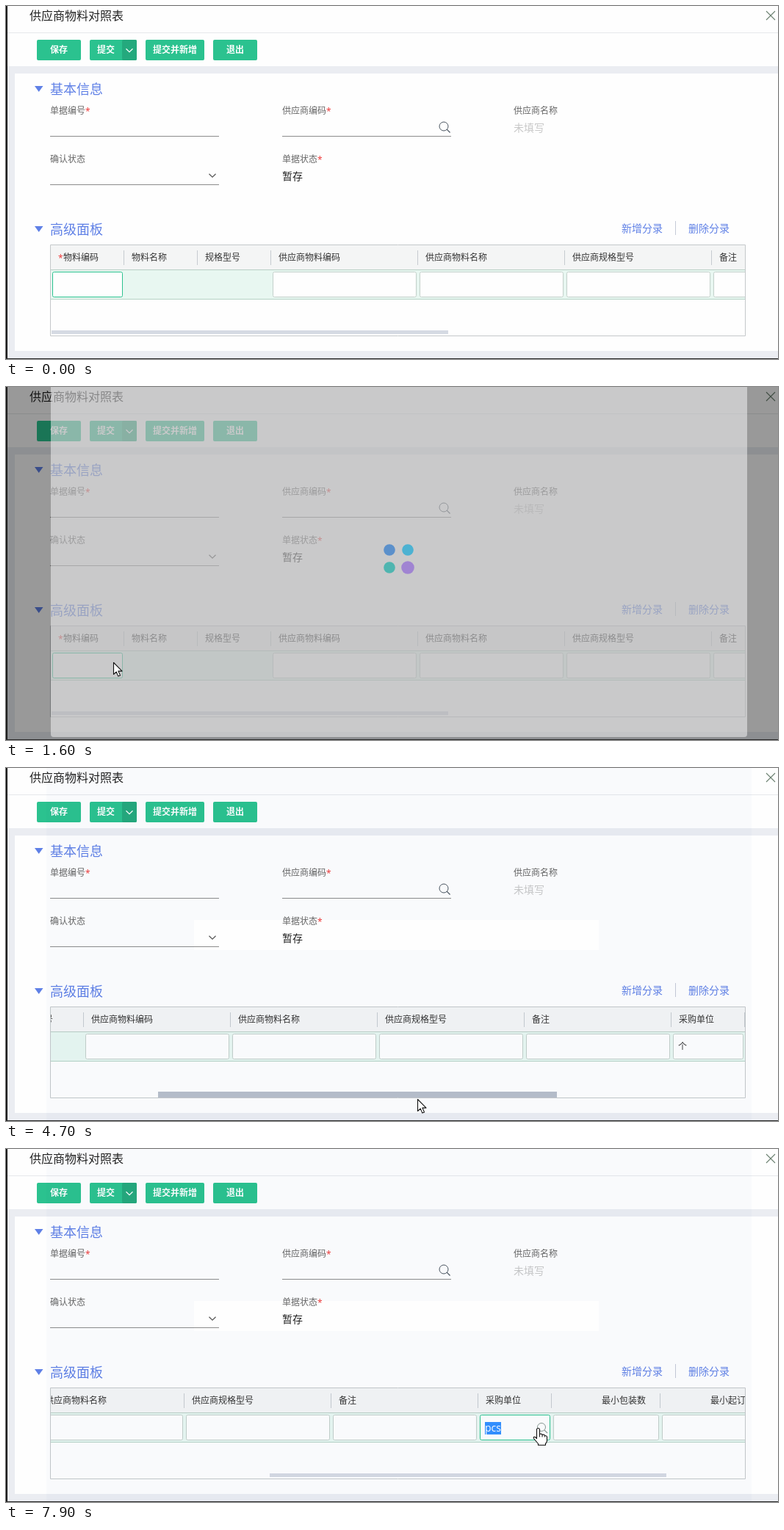
An HTML page with a canvas for the animation above (8000 ms loop, 1051 px wide and 481 px high).

```html
<!DOCTYPE html>
<html lang="zh-CN">
<head>
<meta charset="utf-8">
<style>
html, body { margin: 0; width: 1051px; height: 481px; overflow: hidden; }
canvas { display: block; }
</style>
</head>
<body>
<canvas id="stage" width="1051" height="481"></canvas>
<script>
const c = document.getElementById('stage').getContext('2d');
const LOOP = 8000, GREEN = '#2bc28f', BLUE = '#5f80e6', INK = '#333', GREY = '#666';

// ---------- drawing helpers ----------
function rect(x, y, w, h, fill) {
  c.fillStyle = fill;
  c.fillRect(x, y, w, h);
}

function box(x, y, w, h, fill, stroke, r = 2) {
  c.beginPath();
  const d = stroke ? 0.5 : 0;
  c.roundRect(x + d, y + d, w - 2 * d, h - 2 * d, r);
  if (fill) { c.fillStyle = fill; c.fill(); }
  if (stroke) { c.strokeStyle = stroke; c.lineWidth = 1; c.stroke(); }
}

// y is the vertical middle of the glyphs
function text(s, x, y, size = 12, color = INK, align = 'left', weight = 400) {
  c.font = `${weight} ${size}px "Open Sans", "Noto Sans CJK SC", "Noto Sans CJK", sans-serif`;
  c.textAlign = align;
  c.fillStyle = color;
  c.fillText(s, x, y + size * 0.37);
  return c.measureText(s).width;
}

function line(color, width, ...p) {
  c.beginPath();
  for (let i = 0; i < p.length; i += 2) c.lineTo(p[i], p[i + 1]);
  c.strokeStyle = color;
  c.lineWidth = width;
  c.stroke();
}

function poly(fill, ...p) {
  c.beginPath();
  for (let i = 0; i < p.length; i += 2) c.lineTo(p[i], p[i + 1]);
  c.closePath();
  c.fillStyle = fill;
  c.fill();
}

function circle(x, y, r, fill, stroke) {
  c.beginPath();
  c.arc(x, y, r, 0, 7);
  if (fill) { c.fillStyle = fill; c.fill(); }
  if (stroke) { c.strokeStyle = stroke; c.lineWidth = 1; c.stroke(); }
}

const chevron = (x, y, color = '#555', s = 4.5) =>
  line(color, 1.2, x - s, y - s / 2, x, y + s / 2, x + s, y - s / 2);

function cross(x, y, s, color) {
  line(color, 1.1, x - s, y - s, x + s, y + s);
  line(color, 1.1, x - s, y + s, x + s, y - s);
}

function magnifier(x, y, color, r = 6) {
  circle(x - 1, y - 1, r, null, color);
  line(color, 1.2, x - 1 + r * 0.7, y - 1 + r * 0.7, x + r + 1.5, y + r + 1.5);
}

// linear interpolation through [time, ...values] keys
function track(keys, t) {
  let i = keys.findIndex(k => k[0] > t);
  if (i < 0) return keys[keys.length - 1].slice(1);
  if (i === 0) return keys[0].slice(1);
  const a = keys[i - 1], b = keys[i], p = (t - a[0]) / (b[0] - a[0]);
  return a.slice(1).map((v, n) => v + (b[n + 1] - v) * p);
}

// ---------- form page ----------
function button(label, x, w) {
  box(x, 46, w, 28, GREEN);
  return text(label, x + w / 2, 60, 12, '#fff', 'center', 600);
}

function heading(label, y) {
  poly(BLUE, 39, y - 4, 50.5, y - 4, 44.7, y + 4);
  text(label, 60, y, 18, BLUE);
}

function label(s, x, y, required) {
  const w = text(s, x, y, 12, GREY);
  if (required) text('*', x + w, y + 1, 12, '#e33');
}

function page(t) {
  rect(0, 0, 1051, 481, '#ebedf2');
  rect(0, 0, 1051, 82, '#fefefe');
  rect(0, 36, 1051, 1, '#e6e8eb');
  rect(12, 92, 1039, 378, '#fefefe');
  text('供应商物料对照表', 32, 13, 16, '#222');
  cross(1041, 13, 6, '#6b8070');

  button('保存', 42, 60);
  box(114, 46, 64, 28, GREEN);
  text('提交', 136, 60, 12, '#fff', 'center', 600);
  box(158, 46, 20, 28, '#24a97d');
  chevron(168, 60.5, '#fff');
  button('提交并新增', 190, 80);
  button('退出', 282, 60);

  heading('基本信息', 113);
  label('单据编号', 60, 143, true);
  label('供应商编码', 376, 143, true);
  label('供应商名称', 691, 143);
  text('未填写', 691, 166, 14, '#c8c8c8');
  label('确认状态', 60, 209);
  label('单据状态', 376, 209, true);
  text('暂存', 376, 232, 14, '#222');
  for (const [x, y] of [[60, 177], [376, 177], [60, 243]]) rect(x, y, 230, 1, '#8c8c8c');
  magnifier(597, 165, '#4a5560');
  chevron(281, 231);

  heading('高级面板', 304);
  text('新增分录', 838, 303, 14, BLUE);
  text('删除分录', 929, 303, 14, BLUE);
  rect(911, 293, 1, 19, '#c5cad6');
  grid(t);
}

const COLS = [
  ['物料编码', 100, true, 'G21048111'], ['物料名称', 100, false, 'SRM TEST 1'],
  ['规格型号', 100, false, 'TEST 2'], ['供应商物料编码', 200, true],
  ['供应商物料名称', 200, true], ['供应商规格型号', 200, true],
  ['备注', 200, true], ['采购单位', 100, true, '个'],
  ['最小包装数', 148, true], ['最小起订量', 148, true]
];
const THUMB = [[4400, 0], [4700, 146], [5100, 297]];

function grid(t) {
  const [thumb] = track(THUMB, t);
  const filled = t >= 4000, focus = t < 7300 ? 0 : 7, drag = t >= 4400 && t < 5400;
  rect(60, 325, 947, 125, '#fefefe');
  rect(60, 326, 947, 33, '#f4f5f5');
  rect(60, 360, 947, 39, '#e8f7f1');
  rect(60, 359, 947, 1, '#b9cfc5');
  rect(60, 399, 947, 1, '#b4d3c5');

  c.save();
  c.beginPath();
  c.rect(61, 326, 945, 123);
  c.clip();
  let x = 60 - Math.round(thumb * 1.744);
  COLS.forEach(([name, w, input, value], i) => {
    if (i > 7) text(name, x + w - 19, 343, 12, INK, 'right');
    else text(name, x + (i ? 11 : 18), 343);
    if (!i) text('*', x + 11, 344, 12, '#e33');
    rect(x + w, 333, 1, 20, '#c6cbd0');
    if (input) box(x + 3, 362, w - 4, 35, '#fefefe', i === focus ? GREEN : '#c3d0ca');
    if (i === 7 && focus === 7) magnifier(x + 88, 380, '#8a9a94', 5.5);
    if (i === 7 && t >= 7600) {
      rect(x + 10, 372, 22, 17, '#3390ff');
      text('pcs', x + 10, 380, 14, '#fff');
    } else if (filled && value) text(value, x + 10, 380);
    x += w;
  });
  if (drag) rect(61 + thumb, 441, 543, 8, '#b8bfcb');
  else rect(62 + thumb, 442, 540, 5, '#d5dae3');
  c.restore();
  box(60, 325, 947, 125, null, '#c4c8ca', 0);
}

// ---------- material picker ----------
const ITEMS = [
  ['002', '电脑', 'DIAN02'], ['G21048104', 'SRM TEST 1', 'TEST 2'],
  ['G21048111', 'SRM TEST 1', 'TEST 2'], ['G21048112', 'SRM TEST 1', 'TEST 2'],
  ['Item-00000001', '软件', 'AAA'], ['Item-00000002', '测试辅助', 'BBB'],
  ['Item-00000011', '测试02', '02'], ['', '', '']
];
const RULE = '#c3c7cb', PAPER = '#f9fafc';

function tree() {
  text('物料基本分类标准', 63, 75);
  chevron(235, 75);
  rect(62, 91, 182, 1, '#8c9096');
  rect(55, 113, 199, 28, '#69d5b1');
  poly('#fff', 55, 124, 65, 124, 60, 131);
  text('全部', 71, 127, 14, '#fff', 'left', 600);
  poly('#a5b2d6', 77, 150.5, 77, 159.5, 83.5, 155);
  text('待分类', 91, 155);
  for (let y = 183; y < 360; y += 28) text('name001', 91, y);
  text('包含下级', 111, 414, 12, GREY);
  box(167, 404, 36, 21, '#29b574', null, 10.5);
  circle(192.5, 414.5, 9, '#fff');
}

function pager() {
  text('共 1 页', 458, 73, 12, GREY);
  text('第', 506, 73, 12, GREY);
  box(523, 62, 30, 23, '#fff', '#bbb');
  text('1', 538, 73, 12.4, INK, 'center');
  text('页', 556, 73, 12, GREY);
  [579, 613, 647, 681].forEach((x, i) => {
    const m = x + 12, s = i < 2 ? -1 : 1;
    box(x, 62, 24, 23, null, '#dfe1e4');
    line('#c4c6ca', 1.1, m - 3 * s, 68, m + 2 * s, 73.5, m - 3 * s, 79);
    if (i % 3 === 0) line('#c4c6ca', 1.1, m + 5 * s, 68, m + 5 * s, 79);
  });
  box(705, 62, 100, 23, '#fff', '#c8cbd0');
  text('20条 / 页', 720, 73, 12.2, GREY);
  chevron(793, 73);
}

function items(picked, loaded) {
  rect(256, 94, 559, 33, '#f4f5f7');
  rect(256, 127, 551, 1, RULE);
  circle(273.5, 112, 6.5, '#fff', '#c4c6ca');
  text('编码', 346, 112);
  text('名称', 496, 112);
  text('规格型号', 696, 112);
  rect(485, 101, 1, 21, RULE);
  rect(685, 101, 1, 21, RULE);
  rect(785, 94, 1, 33, '#d8dbdf');
  circle(800, 110, 2.5, null, '#6b8ac4');
  circle(800, 110, 5.5, null, '#6b8ac4');
  for (let a = 0; a < 6.2; a += Math.PI / 4)
    line('#6b8ac4', 1.6, 800 + 5.5 * Math.cos(a), 110 + 5.5 * Math.sin(a), 800 + 7.2 * Math.cos(a), 110 + 7.2 * Math.sin(a));
  if (!loaded) return;

  c.save();
  c.beginPath();
  c.rect(256, 128, 559, 303);
  c.clip();
  ITEMS.forEach(([code, name, model], i) => {
    const y = 148 + 40 * i, on = picked && i === 2;
    rect(256, y - 20, 551, 39, on ? '#e9f7f0' : i % 2 ? '#f7f8f9' : PAPER);
    rect(256, y + 19, 551, 1, RULE);
    circle(273.5, y, on ? 7 : 6.5, on ? GREEN : '#fff', on ? GREEN : '#cfd1d5');
    if (on) line('#fff', 1.6, 270, y, 272.8, y + 2.8, 277.3, y - 2.3);
    text(i + 1, 313, y, 12.4, INK, 'center');
    const w = text(code, 346.5, y, 12.4, '#2a86e8');
    rect(346.5, y + 6, w, 1, '#2a86e8');
    text(name, 496.5, y, 12.4);
    text(model, 696.5, y, 12.4);
  });
  c.restore();
  rect(337, 424, 206, 5, '#d3d7de');
  rect(808, 128, 5, 239, '#d0d5dd');
}

function dialog(t) {
  box(55, -10, 960, 490, PAPER, null, 4);
  if (t < 1800) return;
  const picked = t >= 3100, hover = t >= 3400;
  text('物料', 93, 20, 18, INK, 'left', 700);
  magnifier(762, 14, '#6b8ac4');
  text('请搜索编码 / 名称 / 简拼', 775, 14, 12, '#b4b6ba');
  rect(754, 27, 201, 1, RULE);
  cross(989, 13, 6, '#777');
  tree();
  pager();
  items(picked, t >= 2200);
  rect(55, 52, 960, 1, RULE);
  rect(55, 431, 960, 1, RULE);
  rect(255, 52, 1, 379, RULE);
  rect(815, 52, 1, 379, RULE);
  poly('#667fc4', 249, 237.5, 249, 246.5, 242.5, 242);
  poly('#667fc4', 260, 237.5, 260, 246.5, 266.5, 242);
  text(`已选（ ${picked ? 1 : 0} ）`, 836, 82, 12, '#999');
  text('清空', 971, 82, 12, BLUE);
  if (picked) text('SRM TEST 1', 835, 128, 13.6);
  box(457, 442, 70, 28, '#fcfcfd', '#c8cbd0');
  text('取消', 492, 456, 12, '#888', 'center');
  box(542, 442, 70, 28, hover ? '#74d8b6' : GREEN);
  text('确定', 577, 456, 12, '#fff', 'center');
}

function loader(t) {
  [['#a084d2', 547, 246], ['#4fb5b0', 522, 246], ['#5b90cb', 522, 222], ['#4cb2d2', 547, 222]]
    .forEach(([color, x, y], i) => circle(x, y, t / 100 % 4 === i ? 8.8 : 7.8, color));
}

const SHOW = [[1400, 0], [1600, .5], [1800, 1], [3800, 1], [4100, 0]];

function overlay(t) {
  const [p] = track(SHOW, t);
  if (!p) return;
  rect(0, 0, 1051, 481, `rgba(0,0,0,${Math.min(0.4, p * 0.8)})`);
  c.save();
  c.globalAlpha = p;
  const s = 0.975 + 0.025 * p;
  c.translate(535, 235);
  c.scale(s, s);
  c.translate(-535, -235);
  dialog(t);
  c.restore();
  if (t >= 1600 && t < 2200) loader(t);
}

// faint residue left on the page after the picker closes
function residue() {
  c.save();
  c.globalCompositeOperation = 'multiply';
  c.beginPath();
  c.rect(55, 0, 960, 480);
  c.rect(256, 207, 551, 41);
  c.fillStyle = '#fafbfd';
  c.fill('evenodd');
  c.restore();
}

// ---------- pointer ----------
const PATH = [
  [100, 640, 235], [400, 388, 308], [800, 143, 398], [900, 131, 378], [1100, 146, 375],
  [1700, 146, 375], [2100, 240, 300], [2500, 299, 242], [2600, 299, 242], [2900, 304, 240],
  [3100, 300, 238], [3500, 569, 447], [3900, 569, 447], [4200, 414, 451], [4400, 414, 451],
  [4700, 560, 451], [5100, 711, 451], [5200, 711, 451], [5700, 600, 445], [5800, 600, 445],
  [6000, 520, 440], [6500, 875, 373], [6900, 875, 373], [7400, 697, 373], [7500, 697, 373],
  [7800, 718, 386], [7900, 724, 380]
];

function pointer(t) {
  if (t < 100 || t >= 6600 && t < 7000) return;
  const [x, y] = track(PATH, t);
  c.save();
  c.translate(Math.round(x) + 0.5, Math.round(y) + 0.5);
  const hand = t >= 3400 && t < 4000 || t >= 7600;
  c.beginPath();
  c.strokeStyle = '#111';
  c.fillStyle = '#fff';
  c.lineWidth = 1.1;
  c.lineJoin = 'round';
  const shape = new Path2D(hand
    ? 'M-2 2Q-2 0 0 0Q2 0 2 2V8Q5 7 5.5 9Q8.5 8 9 10Q12 10 12 12V17Q12 19 10 21V23H0V21L-6 14Q-7 11-4 12L-2 14Z'
    : 'M0 0V16L3.7 12.6L6.3 18.6L9 17.4L6.4 11.6H11.5Z');
  c.fill(shape);
  c.stroke(shape);
  if (hand) {
    line('#111', 1, 2, 8, 2, 12);
    line('#111', 1, 5.5, 9, 5.5, 12);
    line('#111', 1, 9, 10, 9, 12);
  }
  c.restore();
}

function frame(now) {
  const t = Math.floor(now % LOOP / 100) * 100;
  page(t);
  if (t >= 4000) residue();
  overlay(t);
  rect(0, 0, 2, 481, '#1c1c1c');
  rect(0, 480, 1051, 1, '#2a2a2a');
  pointer(t);
  requestAnimationFrame(() => frame(performance.now()));
}
frame(0);
</script>
</body>
</html>
```
